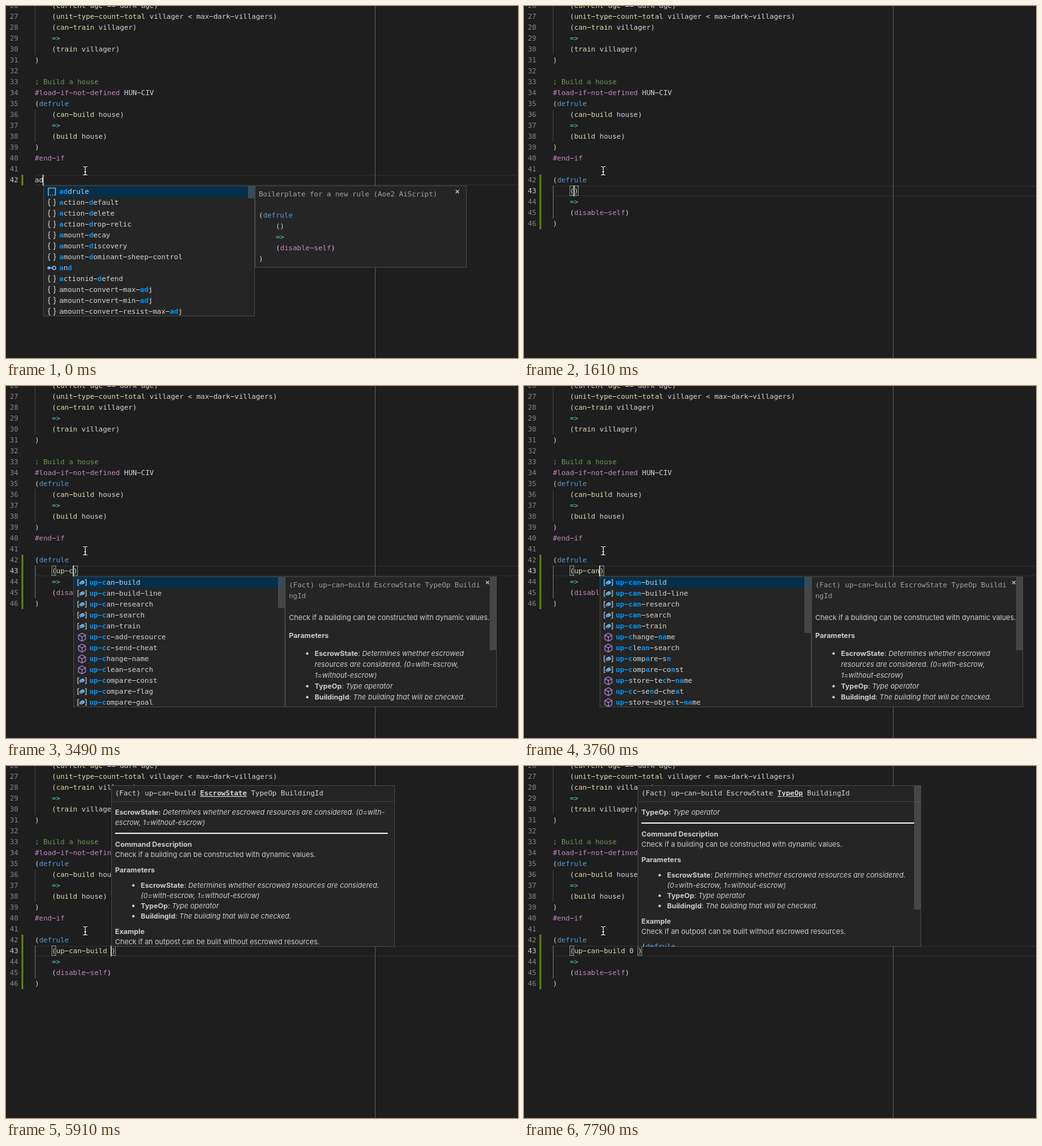
Write an HTML page that moves like this. It is 798 by 549 pixels and loops after 8 s.

```html
<!DOCTYPE html>
<html lang="en">
<head>
<meta charset="utf-8">
<title>Code completion</title>
<style>
html, body { margin: 0; width: 100%; height: 100%; overflow: hidden; background: #1e1e1e; }
#stage { display: block; width: 798px; height: 549px; }
text { white-space: pre; fill: #d4d4d4; }
.mono { font: 11px "DejaVu Sans Mono", Menlo, monospace; }
.sans { font: 11px Inter, sans-serif; fill: #ccc; }
.num { fill: #858585; text-anchor: end; }
.on { fill: #c6c6c6; }
.dim { fill: #a0a0a0; }
.y { fill: #dcdcaa; }
.b { fill: #569cd6; }
.p { fill: #c586c0; }
.t { fill: #4ec9b0; }
.c { fill: #6a9955; }
.m { fill: #0097fb; font-weight: 700; }
.B { font-weight: 700; }
.I { font-style: italic; }
.U { font-weight: 700; text-decoration: underline; }
.line { fill: none; stroke: #c5c5c5; stroke-width: 1.2; }
.cube { fill: none; stroke: #b180d7; stroke-width: 1.2; stroke-linejoin: round; }
</style>
</head>
<body>
<svg id="stage" viewBox="0 0 798 549"></svg>
<script>
const LOOP = 8000, LEFT = 45, ROW = 17, CHAR = 6.6226;
const stage = document.getElementById('stage');

// Inline markup: y[word] wraps a word in a class, *word* marks a match.
const rich = s => s.replace(/</g, '&lt;')
  .replace(/\*(.*?)\*/g, 'm[$1]')
  .replace(/([ybptcmBIU])\[(.*?)\]/g, '<tspan class="$1">$2</tspan>');
const text = (x, y, s, cls) => `<text x="${x}" y="${y}" class="${cls}">${rich(s)}</text>`;
// Code is set with wide hyphens.
const mono = (x, y, s, cls = '') => text(x, y, s.replace(/-/g, '\u2212'), 'mono ' + cls);
const sans = (x, y, s) => text(x, y, s, 'sans');
const rect = (x, y, w, h, fill, more = '') =>
  `<rect x="${x}" y="${y}" width="${w}" height="${h}" fill="${fill}" ${more}/>`;
const path = (d, cls, more = '') => `<path d="${d}" class="${cls}" ${more}/>`;
const panel = (x, y, w, h, body) =>
  `<svg x="${x}" y="${y}" width="${w}" height="${h}">` +
  rect(.5, .5, w - 1, h - 1, '#252526', 'stroke="#454545"') + body + '</svg>';
const slider = (x, h, alpha = 1) => rect(x, 1, 10, h, '#797979', `opacity="${.4 * alpha}"`);
const base = n => 275 + (n - 42) * ROW;

const CODE = [
  '    (y[current-age] == dark-age)',
  '    (y[unit-type-count-total] villager < max-dark-villagers)',
  '    (y[can-train] villager)',
  '    t[=>]',
  '    (y[train] villager)',
  ')',
  '',
  'c[; Build a house]',
  'p[#load-if-not-defined] HUN-CIV',
  '(b[defrule]',
  '    (y[can-build] house)',
  '    t[=>]',
  '    (y[build] house)',
  ')',
  'p[#end-if]',
  ''
];

const ICONS = {
  snippet: path('M-5.5 6V-5.5H5.5V6', 'line') +
    path('M-6 5.5H6', 'line', 'stroke-dasharray="1.5 1.5"'),
  value: path('M-2.5-5.5q-2 0-2 2v1.7q0 1.8-1.5 1.8q1.5 0 1.5 1.8v1.7q0 2 2 2' +
    'M2.5-5.5q2 0 2 2v1.7q0 1.8 1.5 1.8q-1.5 0-1.5 1.8v1.7q0 2-2 2', 'line', 'stroke-width="1.5"'),
  action: path('M0-6L5.5-3V3.5L0 6.5L-5.5 3.5V-3ZM-5.5-3L0 0L5.5-3M0 0V6.5', 'cube'),
  fact: path('M-4.5-4.5H-6.5V4.5H-4.5M4.5-4.5H6.5V4.5H4.5', 'line') +
    path('M-4-.5L1-3.5L4-2V.8L-1 3.5L-4 2Z', '', 'fill="#75beff"') +
    path('M-4-.5L-1 1L4-2M-1 1V3.5', '', 'fill="none" stroke="#252526" stroke-width=".6"'),
  keyword: '<g stroke="#75beff" stroke-width="1.5"><circle cx="-4.8" r="1.5" fill="#75beff"/>' +
    '<path d="M-4 0H1"/><circle cx="3.5" r="2.6" fill="none"/></g>'
};
const KIND = { s: 'snippet', v: 'value', a: 'action', f: 'fact', k: 'keyword' };

// First letter of each item gives its kind.
const LISTS = {
  ad: ['s *ad*drule', 'v *a*ction-*d*efault', 'v *a*ction-*d*elete', 'v *a*ction-*d*rop-relic',
    'v *a*mount-*d*ecay', 'v *a*mount-*d*iscovery', 'v *a*mount-*d*ominant-sheep-control',
    'k *a*n*d*', 'v *a*ctionid-*d*efend', 'v amount-convert-max-*ad*j',
    'v amount-convert-min-*ad*j', 'v amount-convert-resist-max-*ad*j'],
  add: ['s *add*rule', ...['food', 'gold', 'stone', 'wood'].map(r => 'v sn-*add*-starting-resource-' + r),
    ...['cost-data', 'object-by-id', 'object-cost', 'point', 'research-cost'].map(r => 'a up-*add*-' + r),
    'a up-cc-*add*-resource', 'v *a*ctioni*d*-*d*efend'],
  up: ['a add-cost-data', 'a add-object-by-id', 'a add-object-cost', 'a add-point',
    'a add-research-cost', 'f allied-goal', 'f allied-resource-amount', 'f allied-resource-percent',
    'f allied-sn', 'a assign-builders', 'f attacker-class', 'f building-type-in-town']
    .map(s => s.replace(' ', ' *up*-')),
  'up-c': ['f an-build', 'f an-build-line', 'f an-research', 'f an-search', 'f an-train',
    'a c-add-resource', 'a c-send-cheat', 'a hange-name', 'a lean-search', 'f ompare-const',
    'f ompare-flag', 'f ompare-goal'].map(s => s.replace(' ', ' *up-c*')),
  'up-can': [...['build', 'build-line', 'research', 'search', 'train'].map(r => 'f *up-can*-' + r),
    'a *up-c*hange-*na*me', 'a *up-c*le*an*-search', 'f *up-c*omp*a*re-s*n*',
    'f *up-c*omp*a*re-co*n*st', 'a *up-*store-te*c*h-*na*me', 'a *up-c*c-se*n*d-che*a*t',
    'a *up-*store-obje*c*t-*na*me']
};
const BAR = { ad: 19, add: 94, up: 19, 'up-c': 48, 'up-can': 87 };

const CHECK = 'Check if a building can be constructed with dynamic values.';
const LAST_PARAMS = ['•B[TypeOp]: I[Type operator]', '•B[BuildingId]: I[The building that will be checked.]'];
const BUILD_DOC = {
  head: ['(Fact) up-can-build EscrowState TypeOp Buildi', 'ngId'],
  body: [CHECK, '', 'B[Parameters]', '', '•B[EscrowState]: I[Determines whether escrowed]',
    '>I[resources are considered. (0=with-escrow,]', '>I[1=without-escrow)]', ...LAST_PARAMS]
};
const ADD_DOC = {
  head: ['(Action) up-add-cost-data GoalId TypeOp Value'],
  body: ['Add a value to the stored cost data.', '', 'B[Parameters]', '',
    '•B[GoalId]: I[The first of four cost goals.]', '•B[TypeOp]: I[Type operator]',
    '•B[Value]: I[The value to multiply the cost by.]']
};

// Paragraphs and bullets; an empty string is a gap.
function block(x, y, step, gap, lines) {
  let out = '';
  for (const s of lines) {
    if (!s) { y += gap; continue; }
    const inner = /^[•>]/.test(s);
    if (s[0] === '•') out += `<circle cx="${x + 28.5}" cy="${y - 3.8}" r="2" fill="#ccc"/>`;
    out += sans(inner ? x + 40 : x, y, inner ? s.slice(1) : s);
    y += step;
  }
  return out;
}

function list(x, y, name, alpha) {
  const rows = LISTS[name].map((s, i) =>
    `<g transform="translate(13.5 ${9.5 + i * ROW})">${ICONS[KIND[s[0]]]}</g>` +
    mono(25, 13 + i * ROW, s.slice(2)));
  return panel(x, y, 330, 204, rect(1, 1, 328, ROW, '#062f4a') + rows.join('') + slider(319, BAR[name], alpha));
}

function details(x, y, name, alpha) {
  const close = path('M313-2.5l5 5m0-5l-5 5', 'line', 'transform="translate(0 9.5)"');
  if (name.startsWith('ad')) {
    const rule = ['(b[defrule]', '    ()', '    t[=>]', '    (p[disable-self])', ')'];
    return panel(x, y, 330, 128, mono(6, 17, 'Boilerplate for a new rule (Aoe2 AiScript)', 'dim') +
      rule.map((s, i) => mono(6, 50 + i * ROW, s)).join('') + close);
  }
  const doc = name === 'up' ? ADD_DOC : BUILD_DOC;
  const top = 34 + doc.head.length * ROW;
  return panel(x, y, 330, 204, doc.head.map((s, i) => mono(6, 17 + i * ROW, s, 'dim')).join('') +
    block(6, top, ROW, 11, doc.body) + slider(319, 114, alpha) + close);
}

function hint(x, param) {
  const first = param === 'EscrowState';
  const about = first
    ? ['B[EscrowState:] I[Determines whether escrowed resources are considered. (0=with-]', 'I[escrow, 1=without-escrow)]']
    : ['B[TypeOp:] I[Type operator]'];
  const end = 30 + about.length * 16;
  const body = ['B[Command Description]', CHECK, '', 'B[Parameters]', '',
    '•B[EscrowState]: I[Determines whether escrowed resources are considered.]',
    '>I[(0=with-escrow, 1=without-escrow)]', ...LAST_PARAMS, '',
    'B[Example]', 'Check if an outpost can be built without escrowed resources.'];
  const call = '(Fact) up-can-build EscrowState TypeOp BuildingId'.replace(param, `U[${param}]`);
  return panel(x, 30, 442, 252, mono(6, 16, call) + rect(1, 25, 440, 1, '#3c3c3d') +
    block(6, 46, 16, 8, about) + rect(6, end + 12, 425, 2, '#e4e4e4') +
    block(6, end + 34, 16, 8, body) + mono(6, end + 209, '(b[defrule]') +
    (first ? '' : slider(431, 193)));
}

const guide = (from, to, color) =>
  rect(LEFT, base(from) - 12, 1, (to - from + 1) * ROW, color);

const bracket = x => rect(Math.round(x) + .5, 280.5, 6, 15, 'rgba(0,100,0,.1)', 'stroke="#888"');

const beam = 'M120 250.5h1.5q2 0 2 2v9q0 2-2 2h-1.5M127 250.5h-1.5q-2 0-2 2M127 263.5h-1.5q-2 0-2-2M121.8 258.5h3.4';
const pointer = `<g fill="none"><path d="${beam}" stroke="#000" stroke-width="2.6"/>` +
  `<path d="${beam}" stroke="#fff" stroke-width="1.2"/></g>`;

// Each step: start, typed text, then what differs from a plain editor.
const STEPS = [
  [0, 'ad', { list: 'ad' }],
  [270, 'add', { list: 'add' }],
  [810, 'add', { list: 'add', off: true }],
  [1340, 'add', { list: 'add', bar: .15 }],
  [1610, '', {}],
  [2150, '', { off: true }],
  [2690, '', {}],
  [2960, 'up', {}],
  [3230, 'up', { list: 'up' }],
  [3490, 'up-c', { list: 'up-c' }],
  [3760, 'up-can', { list: 'up-can' }],
  [4300, 'up-can', { list: 'up-can', off: true }],
  [4830, 'up-can', { list: 'up-can', bar: .15 }],
  [5100, 'up-can-build', {}],
  [5640, 'up-can-build ', {}],
  [5910, 'up-can-build ', { hint: 'EscrowState' }],
  [6180, 'up-can-build ', { hint: 'EscrowState', off: true }],
  [6720, 'up-can-build ', { hint: 'EscrowState' }],
  [6990, 'up-can-build 0', { hint: 'EscrowState' }],
  [7260, 'up-can-build 0 ', { hint: 'EscrowState' }],
  [7530, 'up-can-build 0 ', { hint: 'TypeOp' }],
  [7790, 'up-can-build 0 ', { hint: 'TypeOp', off: true }]
];

function draw([start, typed, view]) {
  const inRule = start >= 1610;
  const active = inRule ? 43 : 42;
  const top = base(active) - 12;
  const caret = LEFT + (typed.length + (inRule ? 5 : 0)) * CHAR;
  const typedCode = typed.replace(/^[a-z-]+/, 'y[$&]');
  const code = CODE.concat(inRule
    ? ['(b[defrule]', `    (${typedCode})`, '    t[=>]', '    (p[disable-self])', ')']
    : [typed]);

  let out = rect(0, 0, 798, 549, '#1e1e1e') + rect(0, 548, 798, 1, '#211a20');
  out += rect(LEFT + 1, top + 1, 760, ROW - 2, 'none', 'stroke="#282828" stroke-width="2"');
  out += rect(575, 0, 1, 549, '#5a5a5a');
  out += guide(26, 30, '#404040') + guide(36, 38, '#404040');
  if (inRule) out += guide(43, 45, '#707070') + bracket(LEFT + 4 * CHAR) + bracket(caret);
  out += rect(24, 263, 3, inRule ? 5 * ROW : ROW, '#587c0c');
  code.forEach((s, i) => {
    const n = 26 + i;
    out += mono(19.2, base(n), String(n), n === active ? 'num on' : 'num') + mono(LEFT, base(n), s);
  });
  const x = Math.round(caret);
  if (!view.off) out += rect(x - 1, top, 1.6, ROW, '#c8c9c7');
  if (view.list) {
    out += list(x, top + ROW, view.list, view.bar) + details(x + 330, top + ROW, view.list, view.bar);
  }
  if (view.hint) out += hint(x, view.hint);
  stage.innerHTML = out + pointer;
}

let shown = -1;
const begin = performance.now();
function tick() {
  const t = (performance.now() - begin) % LOOP;
  const now = STEPS.filter(s => s[0] <= t).length - 1;
  if (now !== shown) draw(STEPS[shown = now]);
  requestAnimationFrame(tick);
}
tick();
</script>
</body>
</html>
```
